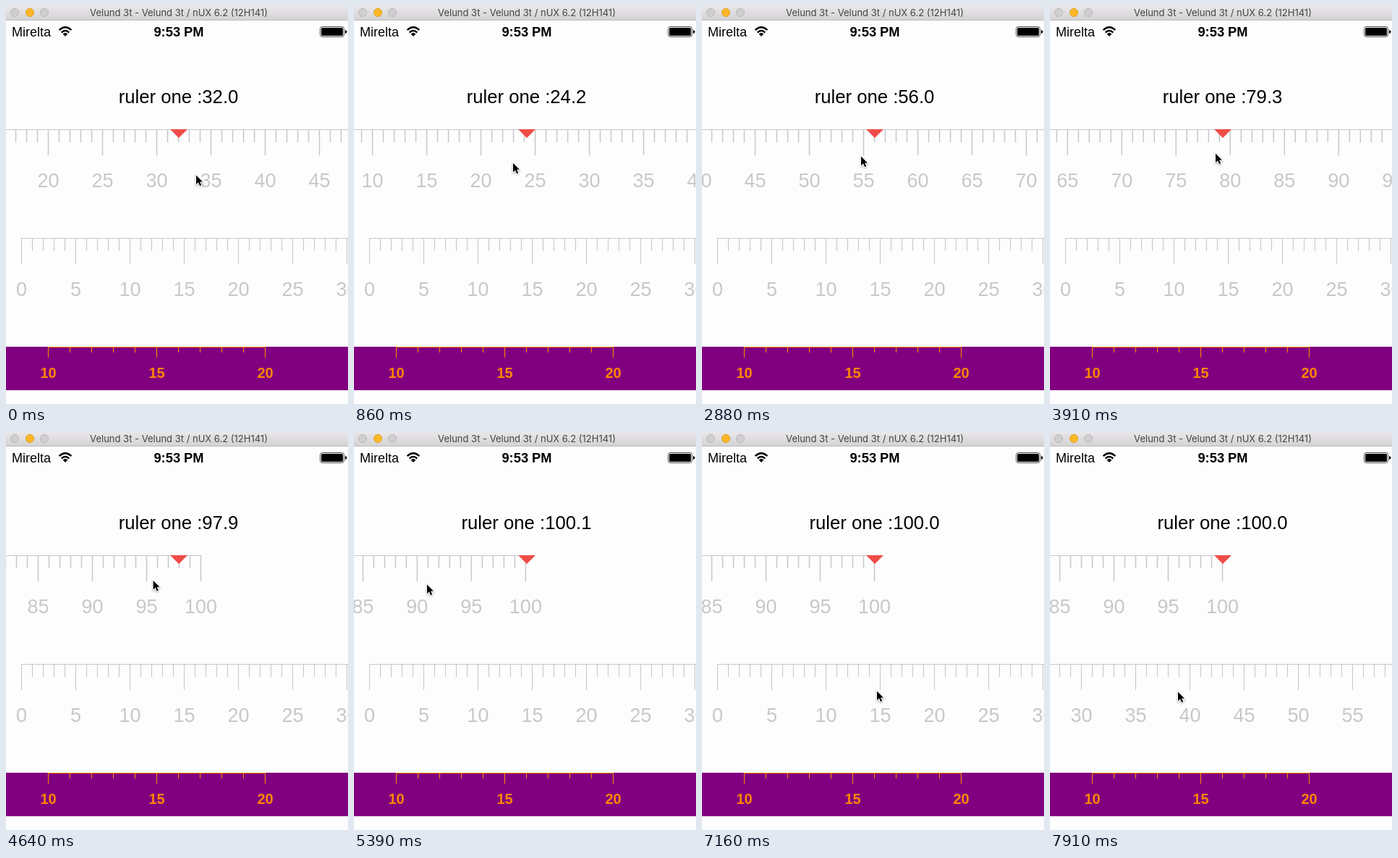
Animation, 473 px wide and 549 px high, one loop 8000 ms. Source, as an HTML page:

```html
<!DOCTYPE html>
<html lang="en">
<head>
<meta charset="utf-8">
<title>Rulers</title>
<style>
  html, body { margin: 0; width: 100%; height: 100%; overflow: hidden; background: #fdfdfd; }
  svg { display: block; font-family: "Liberation Sans", Arial, sans-serif; }
  .mid { text-anchor: middle; }
  .ruler { --ink: #c8c8c8; font-size: 27px; }
  .range { --ink: #ff8500; font-size: 20px; font-weight: bold; }
  .ruler path, .range path { fill: none; stroke: var(--ink); stroke-width: 1.1; }
  #one .ticks { stroke-width: 1.5; }
  .ruler text, .range text { fill: var(--ink); text-anchor: middle; }
  #cursor { filter: drop-shadow(0 1px 1px #0005); }
</style>
</head>
<body>
<svg width="473" height="549" viewBox="0 0 473 549">
  <defs>
    <linearGradient id="bar" x2="0" y2="1">
      <stop stop-color="#e9e7e9"/><stop offset="1" stop-color="#d3d1d3"/>
    </linearGradient>
  </defs>
  <rect width="473" height="549" fill="#fdfdfd"/>

  <rect width="473" height="20" fill="url(#bar)"/>
  <rect y="19" width="473" height="1" fill="#bdbbbd"/>
  <g stroke="#bab8ba" fill="#d0ced0">
    <circle cx="12" cy="9" r="5.5"/>
    <circle cx="33" cy="9" r="5.5" fill="#fdb827" stroke="#dfa023"/>
    <circle cx="53" cy="9" r="5.5"/>
  </g>
  <text class="mid" x="239" y="14" font-size="13" fill="#444" style="font-family: Inter, sans-serif">Velund 3t - Velund 3t / nUX 6.2 (12H141)</text>

  <text x="8" y="42" font-size="18">Mirelta</text>
  <g fill="none" stroke="#000" stroke-width="2.4">
    <path d="M73.6 33.2Q82 25.4 90.4 33.2M76.7 36.6Q82 31.6 87.3 36.6"/>
    <path d="M82 42L78.6 38.6Q82 35.6 85.4 38.6Z" fill="#000" stroke="none"/>
  </g>
  <text class="mid" x="239" y="42" font-size="18.3" font-weight="bold">9:53 PM</text>
  <rect x="434.5" y="28.5" width="33" height="14" rx="3" fill="none" stroke="#000" stroke-width=".7"/>
  <rect x="436" y="30" width="30" height="11" rx="1.5"/>
  <path d="M469 33Q471.5 33.5 471.5 35.5T469 38Z"/>

  <text class="mid" id="label" x="238.5" y="134" font-size="25.7"></text>
  <g class="ruler" id="one"></g>
  <path d="M227 170H251L239 182Z" fill="#f04c48"/>
  <g class="ruler" id="two"></g>

  <rect y="470" width="473" height="60" fill="#800080"/>
  <g class="range" id="three" transform="translate(58.5 470)"></g>

  <path id="cursor" d="M1 1.5V14L4 11.2L6.1 16L8.2 15.1L6.1 10.4H10Z" stroke="#fff" stroke-width="2" paint-order="stroke"/>
</svg>
<script>
const LOOP = 8000, STEP = 147, GAP = 15, CENTER = 238.5;
const $ = id => document.getElementById(id);

function buildRuler(id, { from = 0, to = 100, gap = GAP, minor = 18, major = 36, base = 80 }) {
  let ticks = "", labels = "";
  for (let v = from; v <= to; v++) {
    const x = (v - from) * gap, big = v % 5 === 0;
    ticks += `M${x} 0V${big ? major : minor}`;
    if (big) labels += `<text x="${x}" y="${base}">${v}</text>`;
  }
  $(id).innerHTML =
    `<path d="M0 .5H${(to - from) * gap}"/><path class="ticks" d="${ticks}"/>${labels}`;
}

buildRuler("one", {});
buildRuler("two", {});
buildRuler("three", { from: 10, to: 20, gap: 30, minor: 8, major: 15, base: 43 });

const bursts = [[410, 1300], [1900, 2880], [3170, 4200], [4340, 5540], [5830, 6720], [7010, 7910]];

function heldTime(t) {
  const burst = bursts.filter(b => b[0] <= t).pop();
  if (!burst) return 0;
  const [start, end] = burst;
  const step = (end - start) / Math.round((end - start) / STEP);
  return Math.min(end, start + Math.floor((t - start) / step) * step);
}

const coast = p => 1 - (1 - p) ** 3;
const smooth = p => p * p * (3 - 2 * p);

// Each glide is [start, end, ...target] and sets off from where the last one stopped.
function track(ease, origin, ...glides) {
  return t => glides.reduce((pos, [start, end, ...to]) => {
    const p = ease(Math.min(1, Math.max(0, (t - start) / (end - start))));
    return pos.map((v, i) => v + (to[i] - v) * p);
  }, origin);
}

const reading = track(coast, [32],
  [380, 1300, 23.2], [1900, 2880, 56], [3030, 4300, 80], [4300, 5090, 102], [5090, 5540, 100]);
const scroll = track(coast, [0], [7160, 7910, 428]);
const pointer = track(smooth, [262, 232],
  [380, 1300, 180, 200], [1900, 2880, 219, 206], [3030, 3900, 228, 202],
  [4340, 5390, 100, 209], [5700, 6720, 200, 358], [6900, 7160, 241, 356], [7160, 7910, 176, 357]);

const move = (id, x, y) => $(id).setAttribute("transform", `translate(${x} ${y})`);

function draw(now) {
  const t = heldTime(now % LOOP);
  const [value] = reading(t);
  $("label").textContent = `ruler one :${value.toFixed(1)}`;
  move("one", CENTER - value * GAP, 170);
  move("two", 21.5 - scroll(t)[0], 320);
  move("cursor", ...pointer(t));
}

const start = performance.now();
function loop() {
  draw(performance.now() - start);
  requestAnimationFrame(loop);
}
loop();
</script>
</body>
</html>
```
